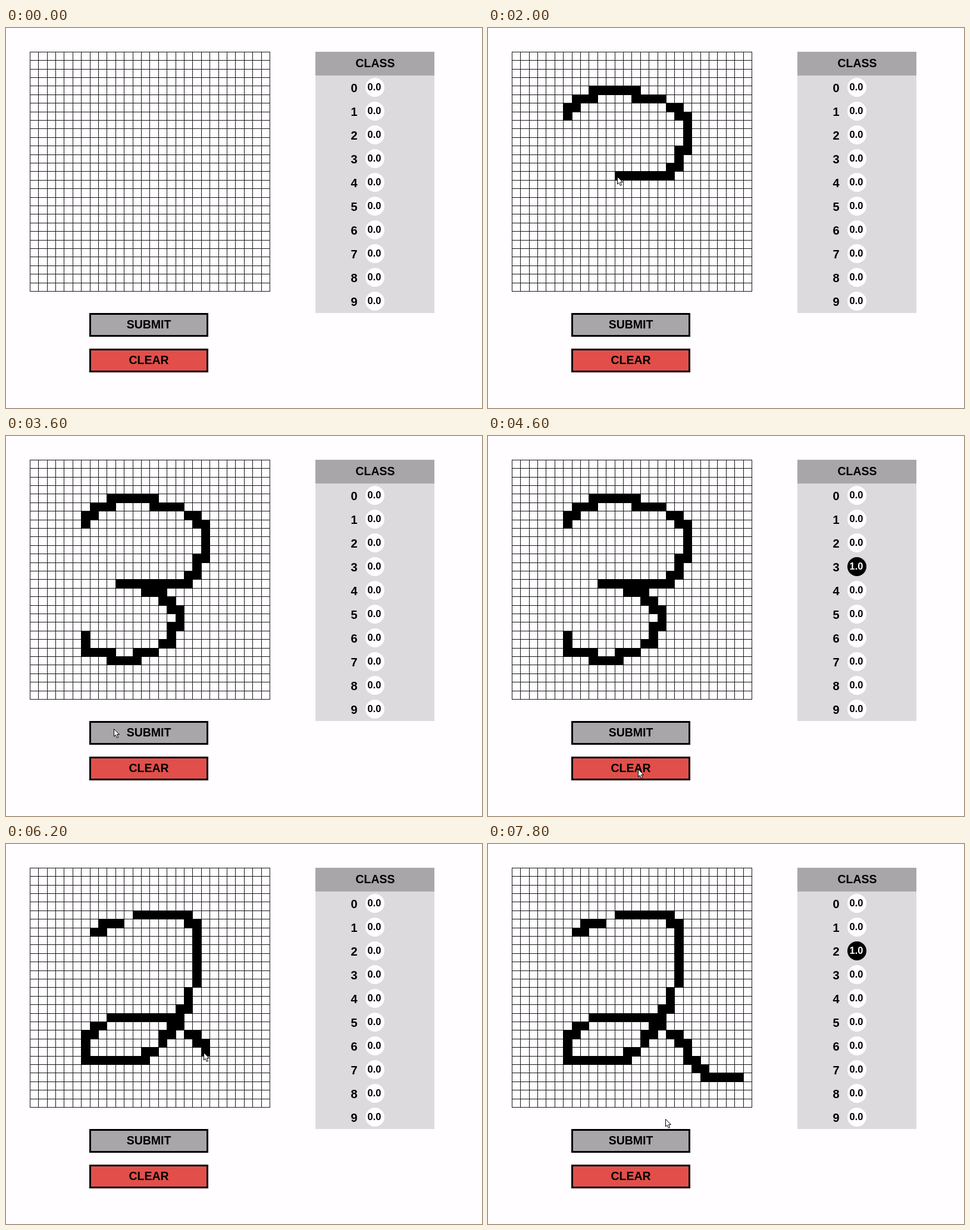
Animation, 800 px wide and 640 px high, one loop 8000 ms. Source, as an HTML page with a canvas:

```html
<!DOCTYPE html>
<html lang="en">
<head>
<meta charset="utf-8">
<title>Digit classifier</title>
<style>
html, body { margin: 0; width: 100%; height: 100%; overflow: hidden; background: #fffdff; }
canvas { display: block; }
</style>
</head>
<body>
<canvas id="stage" width="800" height="640"></canvas>
<script>
const ctx = document.getElementById('stage').getContext('2d');
const STEP = 200, LOOP = 8000, BG = '#fffdff', GREY = '#a8a6a8';
const edge = i => Math.round(39.8 + 14.4 * i);

// Joins "column,row" corners by even staircases; "|" lifts the pen.
function trace(text) {
  const cells = [];
  for (const stroke of text.split('|')) {
    const corners = stroke.split(' ').map(word => word.split(',').map(Number));
    let [x, y] = corners[0];
    cells.push([x, y]);
    for (const [tx, ty] of corners.slice(1)) {
      const nx = Math.abs(tx - x), ny = Math.abs(ty - y);
      const sx = Math.sign(tx - x), sy = Math.sign(ty - y);
      for (let i = 0, j = 0; i + j < nx + ny;) {
        if ((i + .5) / nx <= (j + .5) / ny) { x += sx; i++; }
        else { y += sy; j++; }
        cells.push([x, y]);
      }
    }
  }
  return cells;
}

// Each digit: its cells, the pen's progress as [time, cells drawn], and when the result appears.
const three = {
  value: 3, shown: 3800, pen: [[1000, 2], [2800, 63]],
  cells: trace('6,7 7,5 9,5 9,4 14,4 14,5 17,5|18,6 20,7 20,11 19,11 19,13 18,14 10,14' +
    '|13,15 15,15 16,17 17,17 17,19 16,19 16,21 15,21|14,22 12,22 12,23 9,23 9,22 6,22 6,20')
};
const two = {
  value: 2, shown: 7400, pen: [[5130, 0], [6200, 61], [6700, 70]],
  cells: trace('7,7 8,6 10,6|12,5 18,5 19,7 19,13|18,14 18,16 17,16 17,18 15,20' +
    '|14,21 13,22 6,22 6,19 7,18 8,18|9,17 17,17|18,19 20,20 20,22 22,24 26,24')
};
const CLEARED = 4800;

// Pointer between drawings: [time, x, y]
const glide = [
  [2800, 130, 337], [3200, 185, 366], [3600, 181, 493], [4000, 181, 493], [4600, 252, 561], [5200, 147, 150],
  [6800, 422, 394], [7200, 270, 520], [7400, 249, 495], [7600, 249, 495], [7800, 298, 463]
];

// Linear interpolation through [time, ...values], held at both ends.
function along(keys, time) {
  const next = keys.findIndex(k => k[0] > time);
  if (next < 1) return keys.at(next).slice(1);
  const a = keys[next - 1], b = keys[next], p = (time - a[0]) / (b[0] - a[0]);
  return a.slice(1).map((v, i) => v + (b[i + 1] - v) * p);
}

function box(x, y, w, h, color) {
  ctx.fillStyle = color;
  ctx.fillRect(x, y, w, h);
}

function label(text, x, baseline, size, color = '#000') {
  ctx.font = `bold ${size}px "Liberation Sans", Arial, sans-serif`;
  ctx.textAlign = 'center';
  ctx.fillStyle = color;
  ctx.fillText(text, x, baseline);
}

function button(text, y, color) {
  box(140, y, 200, 40, '#000');
  box(143, y + 3, 194, 34, color);
  label(text, 240, y + 26, 19.5);
}

function grid(cells) {
  for (let i = 0; i <= 28; i++) {
    box(edge(i), 40, 1, 404, '#181818');
    box(40, edge(i), 404, 1, '#181818');
  }
  for (const [c, r] of cells)
    box(edge(c), edge(r), edge(c + 1) - edge(c) + 1, edge(r + 1) - edge(r) + 1, '#000');
}

function scores(hit) {
  box(520, 40, 200, 440, '#dcdadc');
  box(520, 40, 200, 40, GREY);
  label('CLASS', 620.5, 66, 19.5);
  for (let i = 0; i < 10; i++) {
    const y = 100 + 40 * i, on = hit === i;
    label(i, 585, y + 8, 20);
    ctx.beginPath();
    ctx.arc(620, y, 16, 0, 2 * Math.PI);
    ctx.fillStyle = on ? '#000' : BG;
    ctx.fill();
    label(on ? '1.0' : '0.0', 619, y + 5, 16.5, on ? BG : '#000');
  }
}

function cursor(x, y) {
  ctx.beginPath();
  for (const [dx, dy] of [[.5, .5], [.5, 13], [3.3, 10.4], [5.3, 15.3], [7.6, 14.4], [5.6, 9.6], [9.5, 9.6]])
    ctx.lineTo(x + dx, y + dy);
  ctx.closePath();
  ctx.fillStyle = '#fff';
  ctx.fill();
  ctx.strokeStyle = '#000';
  ctx.lineWidth = 1;
  ctx.stroke();
}

function draw(time) {
  const { value, shown, pen, cells } = time < CLEARED ? three : two;
  const started = time >= pen[0][0], drawing = started && time < pen.at(-1)[0];
  const drawn = started ? cells.slice(0, Math.floor(along(pen, time)[0])) : [];

  box(0, 0, 800, 640, BG);
  grid(drawn);
  scores(time >= shown ? value : -1);
  button('SUBMIT', 480, GREY);
  button('CLEAR', 540, '#e24f4a');

  if (drawing) {
    const [c, r] = drawn.at(-1);
    cursor(edge(c) + 4, edge(r) + 9);
  } else if (time >= glide[0][0]) {
    cursor(...along(glide, time).map(Math.round));
  }
}

const start = performance.now();
function tick() {
  const time = (performance.now() - start) % LOOP;
  draw(Math.floor(time / STEP) * STEP);
  requestAnimationFrame(tick);
}
tick();
</script>
</body>
</html>
```
